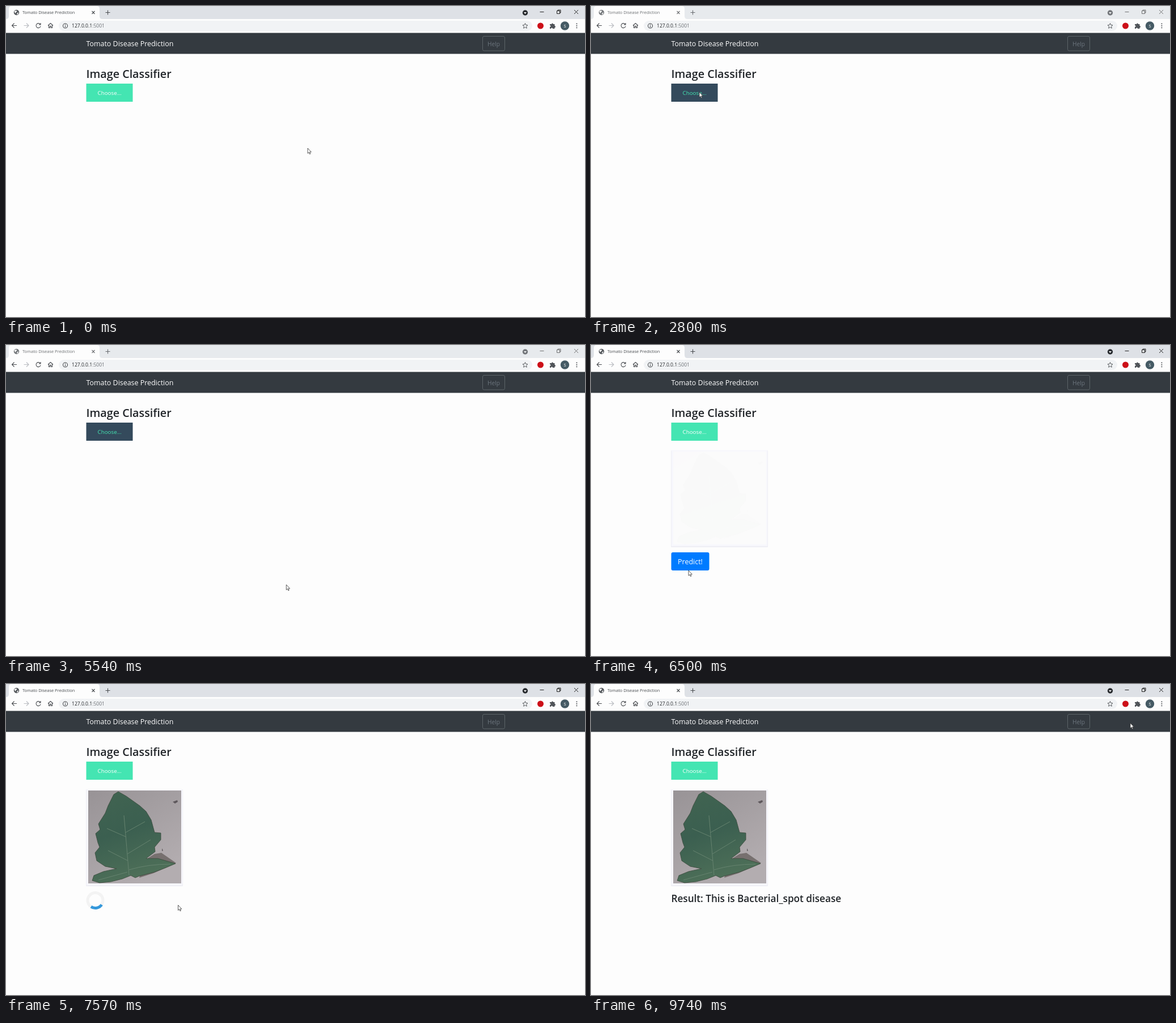
Recreate the animation shown at these times as an HTML page. Size 1021 px wide and 549 px high, loop 9.77 s.

```html
<!DOCTYPE html>
<html lang="en">
<head>
<meta charset="utf-8">
<title>Tomato Disease Prediction</title>
<style>
html, body { margin: 0; width: 100%; height: 100%; overflow: hidden; background: #fdfdfd; }
svg { display: block; width: 100vw; height: 100vh; font-family: "Open Sans", "Noto Sans", sans-serif; }
.line { fill: none; stroke: #494c50; stroke-width: 1.1; }
.head { font-weight: 600; fill: #212529; }
</style>
</head>
<body>
<svg viewBox="0 0 1021 549">
  <rect width="1021" height="549" fill="#fdfdfd"/>

  <!-- tab strip -->
  <rect id="strip" width="1021" height="24"/>
  <path d="M0 23q5 0 5-5V5q0-5 5-5H160q5 0 5 5V18q0 5 5 5z" fill="#fdfdfd"/>
  <g id="tab">
    <circle cx="18.500" cy="11.500" r="4.700" fill="#55595d"/>
    <path d="M15 9l3-1 1.500 1.500-2 1.500-.5 2-2-2zM20 12l2-.5-1 3-2 .5z" fill="#fdfdfd"/>
    <text x="29" y="14" font-size="7.460" fill="#45494d">Tomato Disease Prediction</text>
    <path class="line" stroke-width="1.300" d="M151.500 9l5 5m0-5l-5 5M175.500 11.500h8m-4-4v8"/>
  </g>
  <g id="controls">
    <circle cx="915.500" cy="12" r="4.700" fill="#292c30"/>
    <path d="M913 11h5l-2.500 3z" fill="#fff"/>
    <path class="line" style="stroke:#222;stroke-width:1" d="M941.500 10.500h7M971.500 8.500h5v5h-5zM973 8V7h5v5h-1M1002 7l7 7m0-7l-7 7"/>
  </g>

  <!-- toolbar -->
  <rect y="23" width="1021" height="24.500" fill="#fdfdfd"/>
  <rect x="93" y="26" width="835" height="18" rx="9" fill="#f1f3f5"/>
  <path class="line" d="M19 34.500h-8.500m4-4l-4 4 4 4"/>
  <path class="line" style="stroke:#b9bcc0" d="M31.500 34.500H40m-4-4l4 4-4 4"/>
  <path class="line" d="M60.500 32.500a4 4 0 1 0 .5 3M61 30v3h-3M74 34.500l4.500-4 4.500 4M75.500 34v4.500h2v-3h2v3h2V34"/>
  <circle class="line" cx="104.500" cy="35" r="4"/>
  <path class="line" d="M104.500 34.500v3m0-5.200v1.200"/>
  <text x="116" y="38" font-size="8.560" fill="#26292c">127.0.0.1<tspan fill="#6c7075">:5001</tspan></text>
  <path class="line" style="stroke-width:.9" d="M915.500 30.500l1.300 3 3.200.3-2.400 2.200.7 3.300-2.800-1.800-2.800 1.800.7-3.300-2.400-2.200 3.200-.3z"/>
  <circle cx="942.500" cy="35" r="5.500" fill="#cc1018"/>
  <path d="M959 32h3a1.500 1.500 0 1 1 3 0h2.500v3a1.500 1.500 0 1 1 0 3v2H964a1.500 1.500 0 1 0-3 0h-2v-3a1.500 1.500 0 1 0 0-3z" fill="#505459"/>
  <circle cx="985.500" cy="35" r="7.700" fill="#455a64"/>
  <text x="985.500" y="37.800" font-size="7.500" fill="#fff" text-anchor="middle">S</text>
  <path d="M1005.500 30.500h1.800v1.800h-1.800zm0 3.500h1.800v1.800h-1.800zm0 3.500h1.800v1.800h-1.800z" fill="#505459"/>

  <!-- page -->
  <rect y="47.500" width="1021" height="37" fill="#343a40"/>
  <text x="141.500" y="71" font-size="12.430" fill="#fdfdfd">Tomato Disease Prediction</text>
  <rect x="840.500" y="53.500" width="39" height="25.500" rx="2.500" fill="none" stroke="#5c6468"/>
  <text x="849" y="70.500" font-size="10.200" fill="#6c757d">Help</text>
  <text class="head" x="141.500" y="127" font-size="19.700">Image Classifier</text>
  <rect id="choose" x="141.500" y="137" width="82" height="32"/>
  <text id="chooseText" x="161.500" y="157.300" font-size="9.800">Choose...</text>

  <g id="section">
    <rect x="141" y="186" width="171" height="171" rx="1" fill="#efeff5"/>
    <rect x="142" y="185.500" width="169" height="169.500" fill="#f7f7fc"/>
    <rect x="145" y="188" width="164" height="164" fill="#fdfdfd"/>
    <g id="photo">
      <rect x="145" y="188" width="164" height="164" fill="url(#paper)"/>
      <path d="M262 300l12-2 26 18-40 18-25 8 8-30z" fill="#77706f"/>
      <path id="leaf" fill="url(#green)" stroke="#3a4a3c" stroke-width=".8" d="M198 190L212 198 236 215 247 225 256 240 262 262 273 263 273 275 262 288 263 296 247 308 268 308 299 317 280 325 262 332 235 339 228 342 220 338 205 344 185 349 165 351 152 347 155 338 172 331 195 326 175 322 160 312 157 298 165 288 162 280 158 264 166 257 163 247 175 228 180 215 190 195z"/>
      <path fill="none" stroke="#66836f" stroke-width="1" d="M217 338Q213 290 208 232M215 312L180 294M214 300L255 275M212 270L178 255M211 262L245 243M217 328Q250 318 290 318M214 332L163 346"/>
      <path d="M294 208l8-3 1 3-5 3zM275 290l2 4-2 1zM284 284l2 5" fill="#5e585c"/>
    </g>
  </g>
  <g id="predict">
    <rect id="predictBox" x="141.500" y="366" width="67" height="32" rx="3"/>
    <text x="153" y="387.200" font-size="12.500" fill="#fff">Predict!</text>
  </g>
  <g id="loader" fill="none" stroke-width="5">
    <circle cx="157.500" cy="382" r="13.500" stroke="#f3f3f3"/>
    <path d="M147.950 372.450a13.500 13.500 0 0 1 19.100 0" stroke="#3498db"/>
  </g>
  <text id="result" class="head" x="141.500" y="385" font-size="17.150">Result: This is Bacterial_spot disease</text>

  <!-- pointers, both with the hot spot at 0,0 -->
  <path id="arrow" d="M0 0V9.200L2.100 7.300 3.500 10.500 4.900 9.900 3.500 6.800H6.300z" fill="#fff" stroke="#333" stroke-width=".8"/>
  <path id="hand" d="M-1 .8Q0-.6 1 .8V4L4.500 5Q5.500 5.500 5 8L4 11H-.8L-3.500 7.500Q-4 6-2.500 6L-1 7z" fill="#fff" stroke="#222" stroke-width=".8"/>

  <defs>
    <linearGradient id="paper" x2=".6" y2="1">
      <stop stop-color="#989396"/><stop offset="1" stop-color="#b3adb0"/>
    </linearGradient>
    <linearGradient id="green" x2=".3" y2="1">
      <stop stop-color="#416451"/><stop offset=".5" stop-color="#3b5f50"/><stop offset="1" stop-color="#4d6f58"/>
    </linearGradient>
  </defs>
</svg>
<script>
const LOOP = 9770;
const $ = id => document.getElementById(id);
const set = (id, name, value) => $(id).setAttribute(name, value);
const show = (id, on) => set(id, 'visibility', on ? 'visible' : 'hidden');
const part = (t, start, length) => Math.min(1, Math.max(0, (t - start) / length));
const swing = p => .5 - Math.cos(p * Math.PI) / 2;
const easeOut = p => 1 - (1 - p) ** 2.4;
const mix = (a, b, p) => `rgb(${a.map((v, i) => Math.round(v + (b[i] - v) * p))})`;

const TEAL = [68, 229, 178], SLATE = [52, 74, 92], WHITE = [253, 253, 253];
const BLUE = [0, 123, 255], DEEP_BLUE = [0, 105, 217];

// pointer stops: time, x, y
const stops = [
  [0, 532, 251], [250, 532, 251], [750, 420, 390], [1030, 310, 325], [1470, 200, 166], [1620, 191, 152],
  [3080, 191, 152], [3700, 450, 254], [5150, 450, 254], [5650, 500, 445], [5900, 500, 445],
  [6450, 172, 398], [6600, 172, 398], [6800, 174, 384], [7300, 174, 384], [7900, 481, 399],
  [8500, 481, 399], [8750, 560, 442], [9040, 720, 370], [9600, 951, 69], [LOOP, 951, 69]
];

function pointer(t) {
  const i = stops.findIndex(s => s[0] > t);
  const [t0, x0, y0] = stops[i - 1], [t1, x1, y1] = stops[i];
  const p = swing((t - t0) / (t1 - t0));
  return [x0 + (x1 - x0) * p, y0 + (y1 - y0) * p];
}

function draw(t) {
  const dialog = t >= 2250 && t < 5900;
  set('strip', 'fill', dialog ? '#e7eaed' : '#dee1e6');
  set('tab', 'opacity', dialog ? .8 : 1);
  set('controls', 'opacity', dialog ? .6 : 1);

  const hover = easeOut(part(t, 1470, 400)) - easeOut(part(t, 5920, 400));
  set('choose', 'fill', mix(TEAL, SLATE, hover));
  set('chooseText', 'fill', mix(WHITE, TEAL, hover));

  show('section', t >= 6430);
  set('photo', 'opacity', swing(part(t, 6450, 650)));
  show('predict', t >= 6430 && t < 7100);
  set('predictBox', 'fill', mix(BLUE, DEEP_BLUE, part(t, 6690, 150)));
  show('loader', t >= 7100 && t < 7700);
  set('loader', 'transform', `rotate(${(t - 7100) * .36} 157.5 382)`);
  set('result', 'opacity', swing(part(t, 7700, 600)));

  const [x, y] = pointer(t);
  const hand = t >= 1470 && t < 2250 || t >= 6690 && t < 7100;
  show('hand', hand);
  show('arrow', !hand);
  set(hand ? 'hand' : 'arrow', 'transform', `translate(${x} ${y})`);
}

let start;
function tick(now) {
  start ??= now;
  draw((now - start) % LOOP);
  requestAnimationFrame(tick);
}
draw(0);
requestAnimationFrame(tick);
</script>
</body>
</html>
```
